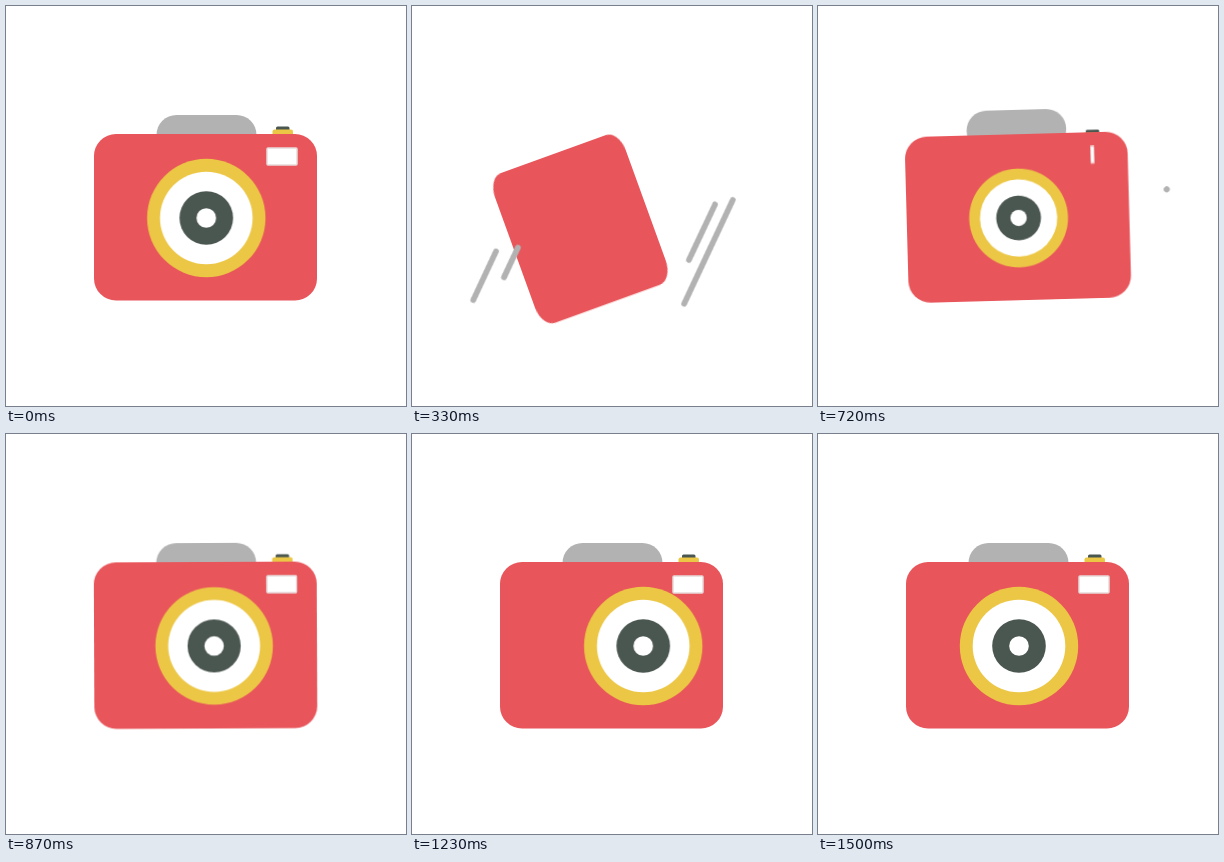
Write an HTML page without scripts that moves like this. It is 400 px wide and 400 px high and loops after 1.53 s.

```html
<!DOCTYPE html>
<html lang="en">
<head>
<meta charset="utf-8">
<title>Camera</title>
<style>
  @property --tail { syntax: "<number>"; inherits: false; initial-value: 0; }
  @property --head { syntax: "<number>"; inherits: false; initial-value: 0; }

  html, body { margin: 0; width: 100%; height: 100%; overflow: hidden; background: #fff; }
  svg { display: block; width: 100vw; height: 100vh; }

  .camera, .body, .hump, .button, .flash, .slide, .grow, .streaks line {
    animation: 1530ms 15ms infinite;
  }

  .camera { animation-name: settle; }
  @keyframes settle {
    0%, 3.9% { transform: rotate(-90deg) scale(.8); animation-timing-function: cubic-bezier(.13, .85, .39, 1); }
    63.7%, 100% { transform: rotate(0deg) scale(1); }
  }

  .body { fill: #e8555a; transform-origin: -112px 0; animation-name: unfold; }
  @keyframes unfold {
    0%, 3.9% { transform: scaleX(0); animation-timing-function: cubic-bezier(.33, 0, .6, 1); }
    35.3% { transform: scaleX(1.1); animation-timing-function: cubic-bezier(.33, 0, .67, 1); }
    47.1%, 100% { transform: scaleX(1); }
  }

  .hump { fill: #b2b2b2; animation-name: rise; }
  @keyframes rise {
    0% { opacity: 0; transform: translateY(28px); animation-timing-function: step-end; }
    25.8% { opacity: 1; transform: translateY(28px); animation-timing-function: cubic-bezier(.33, 0, .5, 1); }
    42.8% { transform: translateY(-6.5px); animation-timing-function: cubic-bezier(.33, 0, .67, 1); }
    55.9%, 100% { opacity: 1; transform: none; }
  }

  .button { animation-name: pop; }
  @keyframes pop {
    0% { opacity: 0; transform: translateY(8px); animation-timing-function: step-end; }
    44.1% { opacity: 1; transform: translateY(8px); animation-timing-function: cubic-bezier(.33, .67, .67, 1); }
    53.9%, 100% { opacity: 1; transform: none; }
  }

  .flash { transform-box: fill-box; transform-origin: center; animation-name: widen; }
  @keyframes widen {
    0% { opacity: 0; transform: scaleX(.07); animation-timing-function: step-end; }
    33.3% { opacity: 1; transform: scaleX(.07); animation-timing-function: linear; }
    46.1% { transform: scaleX(.12); animation-timing-function: cubic-bezier(.33, 0, .5, 1); }
    56.9%, 100% { opacity: 1; transform: none; }
  }

  .grow { animation-name: grow; }
  @keyframes grow {
    0%, 35.3% { transform: scale(0); animation-timing-function: cubic-bezier(.215, .61, .355, 1); }
    59.5%, 100% { transform: scale(1); }
  }

  .slide { animation-name: slide; }
  @keyframes slide {
    0%, 48% { transform: translateX(0); animation-timing-function: cubic-bezier(.33, 0, .48, 1); }
    76.5% { transform: translateX(32.5px); animation-timing-function: cubic-bezier(.33, 0, .67, 1); }
    99%, 100% { transform: translateX(0); }
  }

  .streaks line {
    stroke: #b2b2b2;
    stroke-width: 6;
    stroke-linecap: round;
    stroke-dasharray: calc((var(--head) - var(--tail)) * 1px) 2px;
    stroke-dashoffset: calc(var(--tail) * -1px);
    opacity: 0;
    animation-name: head, tail, show;
  }
  .streaks .early { animation-delay: -5ms; }
  @keyframes head {
    0%, 4.9% { --head: 0; animation-timing-function: cubic-bezier(.33, 0, .4, 1); }
    38.2%, 100% { --head: .998; }
  }
  @keyframes tail {
    0%, 9.8% { --tail: 0; animation-timing-function: cubic-bezier(.33, 0, .67, 1); }
    40.9%, 100% { --tail: .997; }
  }
  @keyframes show {
    0% { opacity: 0; animation-timing-function: step-end; }
    4.9% { opacity: 1; animation-timing-function: step-end; }
    47.1%, 100% { opacity: 0; }
  }
</style>
</head>
<body>
<svg viewBox="-200 -200 400 400">
  <g class="camera">
    <rect class="hump" x="-49.5" y="-91" width="100" height="40" rx="20"/>
    <g class="button">
      <rect x="-130" y="-79.5" width="13.5" height="5" rx="1.5" fill="#4a5650" transform="translate(200)"/>
      <rect x="66.5" y="-76.5" width="20.5" height="8" rx="2" fill="#ecc746"/>
    </g>
    <rect class="body" x="-112" y="-72" width="223" height="166.5" rx="22"/>
    <rect class="flash" x="61" y="-58" width="30" height="17" rx="1" fill="#fff" stroke="#e6dada" stroke-width="1.5"/>
    <g transform="translate(.3 12)">
      <g class="slide">
        <g class="grow">
          <circle r="59.2" fill="#ecc746"/>
          <circle r="46.3" fill="#fff"/>
          <circle r="26.8" fill="#4a5650"/>
          <circle r="9.8" fill="#fff"/>
        </g>
      </g>
    </g>
    <g class="streaks">
      <line class="early" pathLength="1" x1="-92" y1="-35" x2="-205" y2="78"/>
      <line class="early" pathLength="1" x1="-84" y1="-16" x2="-153" y2="53"/>
      <line pathLength="1" x1="20" y1="117" x2="150" y2="-13"/>
      <line pathLength="1" x1="-32" y1="190" x2="211" y2="-53"/>
    </g>
  </g>
</svg>
</body>
</html>
```
